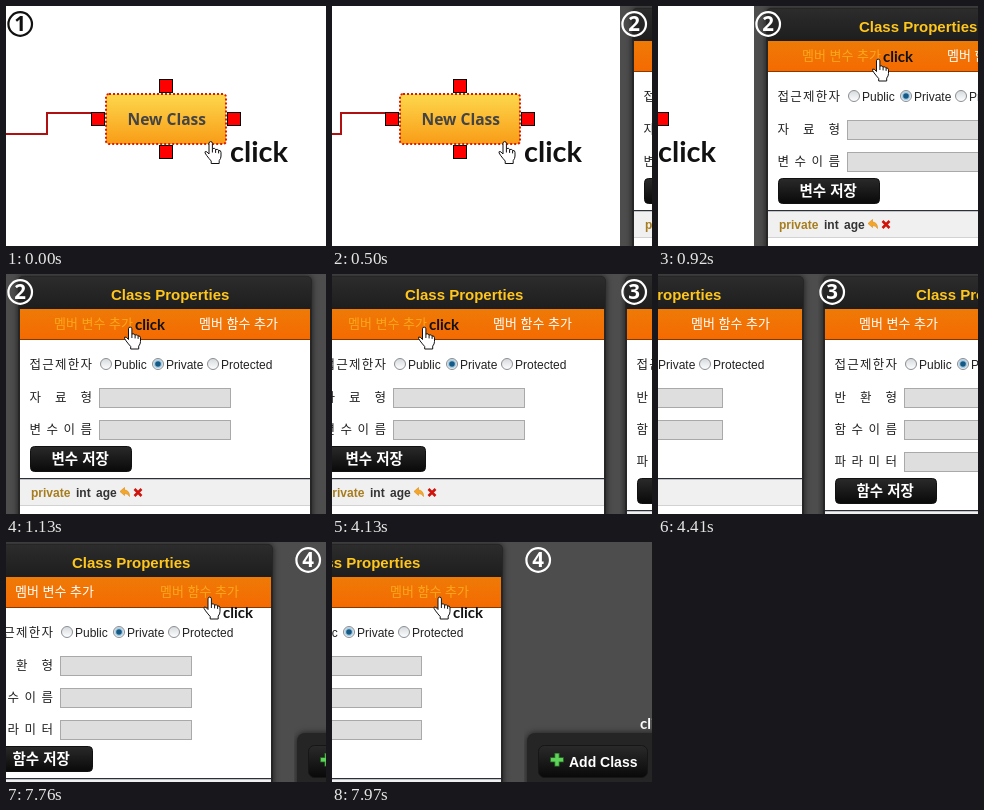
An HTML page that plays this animation: 320x240 px, repeating every 8000 ms.

```html
<!DOCTYPE html>
<html lang="ko">
<head>
<meta charset="utf-8">
<title>Class editor steps</title>
<style>
html, body { margin: 0; width: 100%; height: 100%; overflow: hidden; background: #4d4d4d; }
#stage { display: block; width: 320px; height: 240px; }
text { white-space: pre; }
.ui { font: 12px "Liberation Sans", Arial, sans-serif; }
.bold { font-weight: 700; }
.title { font-size: 15px; }
.add { font-size: 14px; }
.ko { font: 13px "Noto Sans CJK KR", "Noto Sans CJK", sans-serif; }
.label { font-size: 12.5px; }
.save { font-size: 14.5px; font-weight: 700; }
.node { font: 700 15.6px "Open Sans", "Noto Sans", sans-serif; }
.click { font: 700 15px Lato, "Open Sans", sans-serif; }
.big { font-size: 29px; }
.num { font: 700 20.5px "Open Sans", "Noto Sans", sans-serif; text-anchor: middle; }
.shadow { filter: drop-shadow(0 0 3px rgba(0, 0, 0, .65)); }
</style>
</head>
<body>
<svg id="stage" viewBox="0 0 320 240">
  <defs id="defs"></defs>
  <g id="strip"></g>
</svg>
<script>
const LOOP = 8000, STEP = 70, SHIFT = 32, STEPS = 10;
const STARTS = [500, 4130, 7760];

const gradient = (id, from, to) =>
  `<linearGradient id="${id}" x2="0" y2="1"><stop stop-color="${from}"/><stop offset="1" stop-color="${to}"/></linearGradient>`;
const rect = (x, y, w, h, fill, more = '') =>
  `<rect x="${x}" y="${y}" width="${w}" height="${h}" fill="${fill}" ${more}/>`;
const text = (x, y, str, cls, fill, more = '') =>
  `<text x="${x}" y="${y}" class="${cls}" fill="${fill}" ${more}>${str}</text>`;
const path = (d, stroke, width = 1, fill = 'none') =>
  `<path d="${d}" stroke="${stroke}" stroke-width="${width}" fill="${fill}"/>`;
const move = (x, y, body) => `<g transform="translate(${x} ${y})">${body}</g>`;

const badge = (n, color) =>
  `<circle cx="14.2" cy="18" r="11.8" fill="none" stroke="${color}" stroke-width="2.2"/>` +
  text(14.2, 25.3, n, 'num', color);

const hand = (x, y) => move(x, y,
  path('M5 13V2.3a1.7 1.7 0 0 1 3.4 0V7.5q2.8-.8 3.2 1 2.6-.7 3 .9 2.4-.2 2.4 1.9V15q0 2.6-1.8 4.6V22.5H7.2V20Q5 17.6 2.6 14.4 .2 11.4 1.2 10.6 2.6 9.8 5 13Z', '#111', 1, '#fff') +
  path('M8.4 7.5v4M11.6 8.5v3.4M14.6 9.4v3', '#111'));

// Spreads a label evenly over the width of five characters.
const label = (str, y) =>
  text(23.5, y, str, 'ko label', '#222', `style="letter-spacing:${51 / (str.length - 1) - 11.5}px"`);

const radio = (x, str, on) =>
  `<circle cx="${x}" cy="90" r="5.5" fill="url(#radio)" stroke="#8a8f94"/>` +
  (on ? `<circle cx="${x}" cy="90" r="4.4" fill="#a9cde2"/><circle cx="${x}" cy="90" r="2.8" fill="#155a86"/>` : '') +
  text(x + 8, 95, str, 'ui', '#222');

function panel(active, fields, save) {
  const tab = (x, str, i) => text(x, 54, str, 'ko', i === active ? '#fba71c' : '#fff');
  const end = 108 + fields.length * 32;
  return `<g class="shadow">${rect(12, 2, 294, 260, '#262626', 'rx="5"')}</g>` +
    rect(13, 3, 292, 33, 'url(#head)', 'rx="4"') +
    text(105, 25.5, 'Class Properties', 'ui bold title', '#ffc61c') +
    rect(14, 35, 290, 31, 'url(#tabs)') +
    rect(14, 65, 290, 1, '#8a3a00') +
    tab(48, '멤버 변수 추가', 0) + tab(193, '멤버 함수 추가', 1) +
    rect(14, 66, 290, 180, '#fff') +
    label('접근제한자', 95) +
    radio(100, 'Public') + radio(152, 'Private', true) + radio(207, 'Protected') +
    fields.map((f, i) => label(f, 128 + 32 * i) +
      rect(93.5, 114.5 + 32 * i, 131, 19, '#dedede', 'stroke="#a9a9a9"')).join('') +
    rect(24.5, end + .5, 101, 25, 'url(#button)', 'rx="4" stroke="#111"') +
    text(45.5, end + 18.3, save, 'ko save', '#fff') +
    rect(14, end + 32, 290, 1.5, '#2a2f38') +
    rect(14, end + 33.5, 290, 26, '#f0f0f0');
}

const member = rect(14, 231, 290, 1, '#d2d2d2') + rect(14, 232, 290, 10, '#fff') +
  text(25, 223, 'private', 'ui bold', '#a67c1e') +
  text(70, 223, 'int', 'ui bold', '#333') +
  text(90, 223, 'age', 'ui bold', '#333') +
  path('M114 217.5l4.5-4v2.5q5 .2 5 6.5-1.5-3-5-3v2Z', '#d98a14', .6, '#f4a62a') +
  path('M128.5 215l7 7M135.5 215l-7 7', '#d0140c', 2.6);

const port = (x, y) => rect(x + .5, y + .5, 13, 13, '#f00', 'stroke="#000"');

const slides = [
  rect(0, 0, 320, 240, '#fff') + badge(1, '#111') +
    path('M0 128H41V107H86', '#b01010', 2) +
    rect(100, 88, 120, 50, 'url(#node)', 'rx="3" stroke="#e01800" stroke-width="2" stroke-dasharray="2 2"') +
    port(153, 73) + port(153, 139) + port(85, 106) + port(221, 106) +
    text(121.5, 119, 'New Class', 'node', '#444') +
    hand(198, 135) + text(224, 155.5, 'click', 'click big', '#111'),

  panel(0, ['자료형', '변수이름'], '변수 저장') + member + badge(2, '#fff') +
    text(129, 55.5, 'click', 'click', '#111') + hand(117.5, 52.5),

  move(-7, 0, panel(1, ['반환형', '함수이름', '파라미터'], '함수 저장')) + badge(3, '#fff') +
    hand(229, 54.5) + text(249, 75.5, 'click', 'click', '#111'),

  badge(4, '#fff') + text(116, 187, 'click', 'click', '#fff') +
    `<g class="shadow">${rect(3, 191, 330, 70, '#252525', 'rx="8"')}</g>` +
    rect(14.5, 203.5, 109, 32, 'url(#button)', 'rx="6" stroke="#161616"') +
    path('M33 211v13.5M26.2 217.8h13.6', '#2c7a2a', 5) +
    path('M33 211.8v12M27 217.8h12', '#5fd35a', 3.4) +
    text(45, 225, 'Add Class', 'ui bold add', '#fff')
];

document.getElementById('defs').innerHTML =
  gradient('node', '#fdd84c', '#f99c17') + gradient('head', '#2c2c2c', '#1d1d1d') +
  gradient('tabs', '#ee7a06', '#f56a02') + gradient('button', '#2a2a2a', '#090909') +
  gradient('radio', '#d5d9dc', '#fff');

const strip = document.getElementById('strip');
strip.innerHTML = slides.map((body, i) =>
  `<svg x="${i * 320}" width="320" height="240" overflow="hidden">${rect(0, 0, 320, 240, '#4d4d4d')}${body}</svg>`).join('');

const offset = t => STARTS.reduce((sum, s) =>
  sum + SHIFT * Math.max(0, Math.min(STEPS, Math.floor((t - s) / STEP) + 1)), 0);

const start = performance.now();
function draw() {
  const t = (performance.now() - start) % LOOP;
  strip.setAttribute('transform', `translate(${-offset(t)} 0)`);
  requestAnimationFrame(draw);
}
draw();
</script>
</body>
</html>
```
